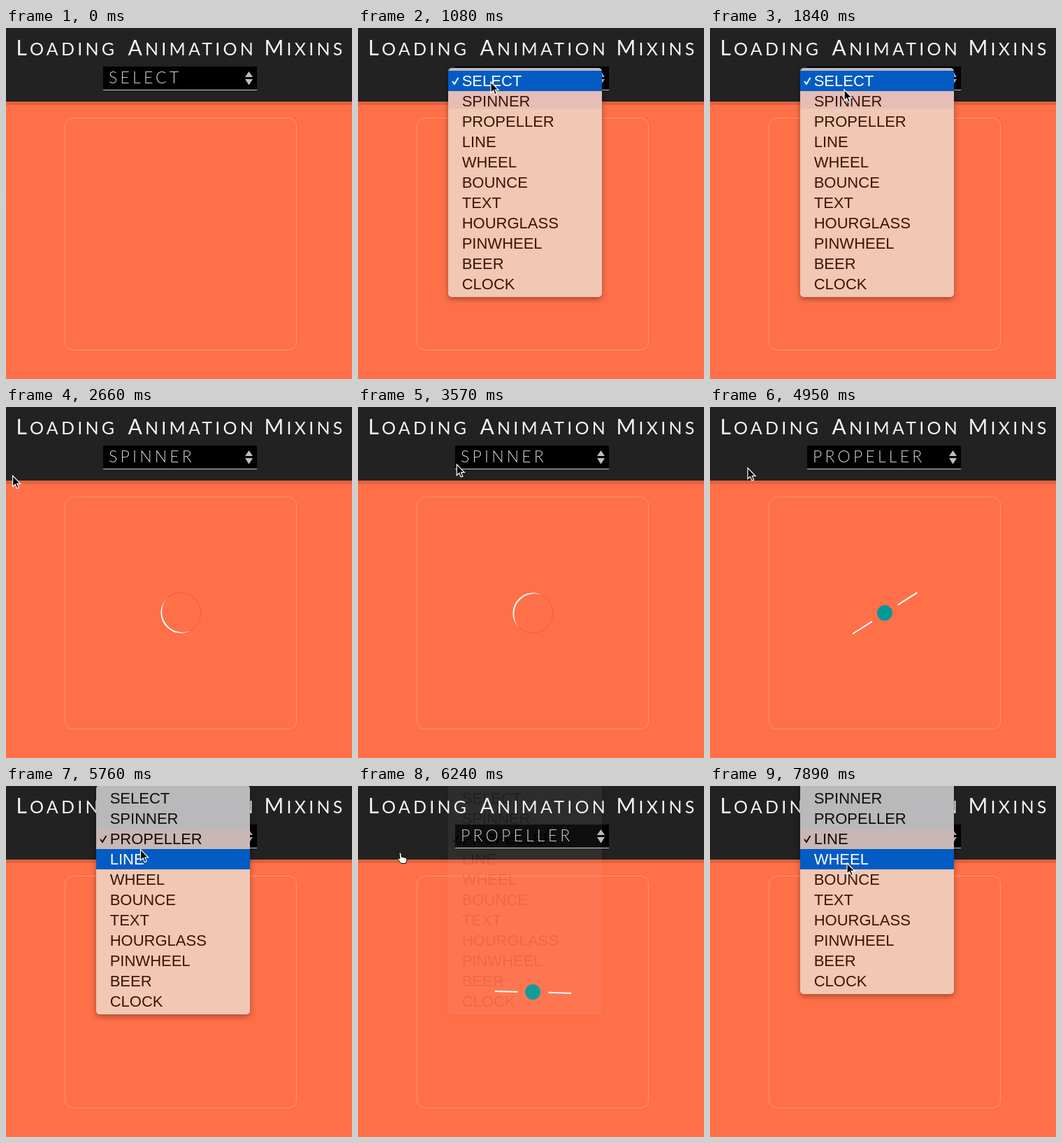
Animation, 495 px wide and 501 px high, one loop 8000 ms. Source, as an HTML page:

```html
<!DOCTYPE html>
<html lang="en">
<head>
<meta charset="utf-8">
<title>Loading Animation Mixins</title>
<style>
  html, body { margin: 0; width: 100%; height: 100%; overflow: hidden; background: #ff7049; }
  svg { display: block; width: 100vw; height: 100vh; }
  .title { font: 400 25px Lato, sans-serif; letter-spacing: 4.2px; fill: #f4f4f4; }
  .title .cap { font-size: 30px; }
  .value { font: 300 23px Lato, sans-serif; letter-spacing: 4.2px; fill: #d0d0d0; }
  .item { font: 22px "Liberation Sans", Arial, sans-serif; }
  .panel { filter: drop-shadow(0 3px 4px rgba(0, 0, 0, .35)); }
</style>
</head>
<body>
<svg viewBox="0 0 495 501">
  <defs>
    <linearGradient id="glass" gradientUnits="userSpaceOnUse" x1="0" y1="0" x2="0" y2="501">
      <stop offset=".116" stop-color="#b9b8ba"/>
      <stop offset=".13" stop-color="#c8b7b5"/>
      <stop offset=".178" stop-color="#c8b7b5"/>
      <stop offset=".182" stop-color="#e5beb6"/>
      <stop offset=".228" stop-color="#e5beb6"/>
      <stop offset=".232" stop-color="#f0c8b4"/>
    </linearGradient>
  </defs>

  <rect width="495" height="501" fill="#ff7049"/>
  <rect y="105" width="495" height="5" fill="#e0633f"/>
  <rect width="495" height="105" fill="#222"/>
  <text class="title" y="39"><tspan class="cap" x="14.5">L</tspan>OADING <tspan class="cap" x="174.5">A</tspan>NIMATION <tspan class="cap" x="369.5">M</tspan>IXINS</text>

  <rect x="139" y="55" width="220" height="33" fill="#000"/>
  <rect x="139" y="88" width="220" height="1" fill="#d0d0d0"/>
  <text id="value" class="value" x="147" y="79"></text>
  <path d="M342 70L347.5 62L353 70ZM342 73L347.5 81.5L353 73Z" fill="#bdbdbd"/>

  <rect x="84.5" y="128.5" width="331" height="331" rx="11" fill="none" stroke="#fff" stroke-opacity=".25"/>

  <g transform="translate(250 294)">
    <g id="spinner">
      <circle r="28.7" fill="none" stroke="#000" stroke-opacity=".12"/>
      <path d="M3 -28.8A29 29 0 0 1 3 28.8A29.45 29.45 0 0 0 3 -28.8Z" fill="#fff"/>
    </g>
    <g id="propeller">
      <path id="blades" d="M-54.7 0H-22M22 0H54.7" stroke="#fff" stroke-width="2"/>
      <circle r="11" fill="#099"/>
    </g>
    <rect id="line" y="-1" height="2" fill="#fff"/>
  </g>

  <g id="menu">
    <rect id="panel" class="panel" x="129" width="220" height="327" rx="5" fill="url(#glass)"/>
    <rect id="glow" x="129" width="220" height="29" fill="#035bc4"/>
    <g id="items"></g>
    <path id="check" d="M135 76L138 80L143.5 71" fill="none" stroke-width="2"/>
  </g>

  <g id="pointer">
    <path id="arrow" d="M0 0V15.5L3.6 12.2L6 18L8.6 16.9L6.2 11.3H11Z" fill="#000" stroke="#fff" stroke-width="1.2"/>
    <path id="hand" d="M3 0q2 0 2 2v4l6 1.5q2 .5 2 3l-1.5 5h-7l-4.5-6q0-2 3-.5l-1-7q0-2 1-2z" fill="#fff" stroke="#111"/>
  </g>
</svg>
<script>
const LOOP = 8000, ROW = 29, ROW_TOP = 61;
const SELECT_SPOT = [190, 77], ITEM_SPOT = [196, 110];
const names = ['SELECT', 'SPINNER', 'PROPELLER', 'LINE', 'WHEEL', 'BOUNCE',
  'TEXT', 'HOURGLASS', 'PINWHEEL', 'BEER', 'CLOCK'];

// Each visit opens the menu, picks the next item and returns to the left
const visits = [
  { from: [-12, 234], go: 50, open: 870, pick: 2098, home: 2804 },
  { from: [-14, 98], go: 3380, open: 3700, pick: 4040, home: 4338 },
  { from: [54, 87], go: 4955, open: 5160, pick: 5995, home: 6240 },
  { from: [57, 95], go: 7250, open: 7600, pick: 7890, home: Infinity }
];
const fadeStart = v => v.pick + 135;
const fadeEnd = v => v.pick + 255;
const changed = v => v.pick + 295;

const $ = id => document.getElementById(id);
const set = (el, attrs) => { for (const k in attrs) el.setAttribute(k, attrs[k]); };
const show = (el, on) => set(el, { display: on ? 'inline' : 'none' });
const mix = (a, b, u) => a + (b - a) * u;
const ease = (t, a, b) => {
  const u = Math.min(1, Math.max(0, (t - a) / (b - a)));
  return u * u * (3 - 2 * u);
};

const labels = names.map(name => {
  const el = document.createElementNS('http://www.w3.org/2000/svg', 'text');
  set(el, { class: 'item', x: 148.7 });
  el.textContent = name;
  return $('items').appendChild(el);
});

function pointerAt(t) {
  const i = Math.max(0, visits.findLastIndex(v => t >= v.go));
  const { from, go, open, pick, home } = visits[i];
  const rest = (visits[i + 1] || visits[i]).from;
  const reach = ease(t, go, Math.min(go + 620, open - 40));
  const choose = ease(t, Math.max(open, pick - 420), pick);
  const back = ease(t, pick + 20, home);
  const backY = 1 - (1 - back) ** 3; // the way home is a shallow arc
  return [back, backY].map((b, k) =>
    mix(mix(mix(from[k], SELECT_SPOT[k], reach), ITEM_SPOT[k], choose), rest[k], b));
}

function drawMenu(t, x, y) {
  const checked = visits.findIndex(v => t >= v.open && t < fadeEnd(v));
  show($('menu'), checked >= 0);
  if (checked < 0) return;
  const visit = visits[checked], start = fadeStart(visit), end = fadeEnd(visit);
  const top = ROW_TOP - ROW * checked;
  const inside = t < start && x >= 129 && x <= 349;
  const hover = inside ? Math.floor((y - top) / ROW) : -1;
  const ink = i => i === hover ? '#fff' : top + ROW * i < 88 ? '#150b0a' : '#3c1408';

  set($('menu'), { opacity: Math.min(1, (end - t) / (end - start)) });
  set($('panel'), { y: top - 4 });
  set($('glow'), { y: top + ROW * hover });
  show($('glow'), hover >= 0);
  set($('check'), { stroke: ink(checked) });
  labels.forEach((el, i) => set(el, { y: top + ROW * i + 22, fill: ink(i) }));
}

function drawLoader(t, state) {
  ['spinner', 'propeller', 'line'].forEach((id, i) => show($(id), state === i + 1));
  set($('spinner'), { transform: `rotate(${144 + (t - 2660) * 360 / 765})` });
  set($('blades'), { transform: `translate(.3 .3) rotate(${-33 + (t - 4950) * 360 / 809})` });
  const half = 85 * (1 - Math.cos((t - changed(visits[2])) * Math.PI / 500)) / 2;
  set($('line'), { x: -half, width: 2 * half });
}

function render(t) {
  const state = visits.filter(v => t >= changed(v)).length;
  const [x, y] = pointerAt(t);
  $('value').textContent = names[state];
  drawLoader(t, state);
  drawMenu(t, x, y);

  const hand = t > 6200 && t < 6420;
  set($('pointer'), { transform: `translate(${x} ${y})` });
  show($('arrow'), !hand);
  show($('hand'), hand);
}

const start = performance.now();
function tick() {
  render((performance.now() - start) % LOOP);
  requestAnimationFrame(tick);
}
tick();
</script>
</body>
</html>
```
